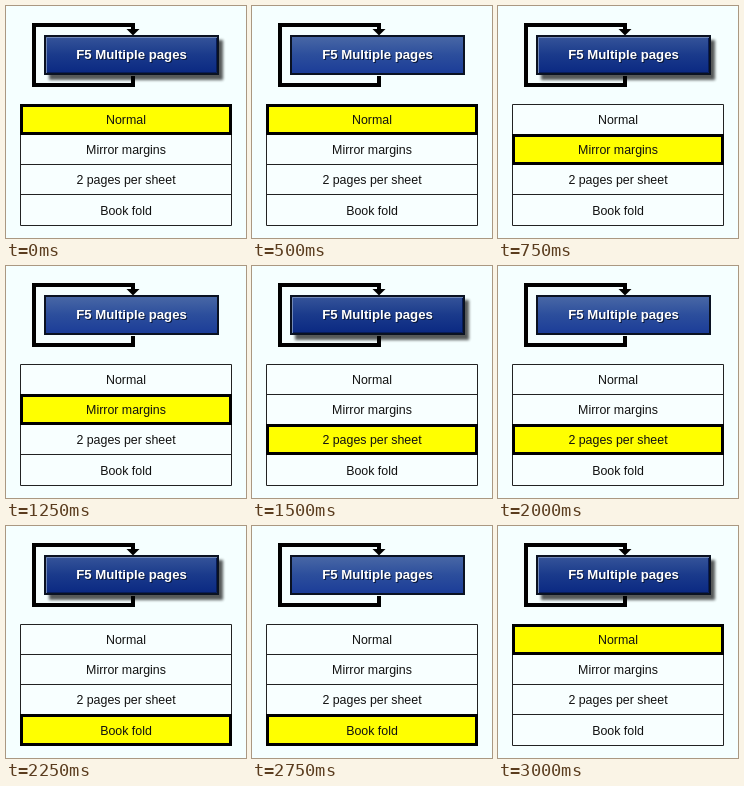
Animation of 240x232 px, one loop 3500 ms. Source, as an HTML page:

```html
<!DOCTYPE html>
<html lang="en">
<head>
<meta charset="utf-8">
<title>Multiple pages</title>
<style>
  html, body { margin: 0; width: 100%; height: 100%; overflow: hidden; background: #f5ffff; }
  svg { display: block; width: 240px; height: 232px; }
  text { font-family: "Liberation Sans", Arial, sans-serif; text-anchor: middle; }
  .label { font-size: 12.4px; fill: #111; }
  .title { font-size: 13.2px; font-weight: bold; }
  .marker { height: 28px; animation: select 3.5s step-end infinite; }
  .raised { animation: press 3.5s step-end infinite; }

  /* The selection moves on every 750 ms; the last row is slightly taller. */
  @keyframes select {
    0%, 85.714% { transform: translateY(0); height: 28px; }
    21.428% { transform: translateY(30px); height: 28px; }
    42.857% { transform: translateY(60px); height: 28px; }
    64.285% { transform: translateY(90px); height: 29px; }
  }
  /* Each step: 500 ms raised, then 250 ms pressed. */
  @keyframes press {
    0%, 21.428%, 42.857%, 64.285%, 85.714% { visibility: visible; }
    14.285%, 35.714%, 57.142%, 78.571% { visibility: hidden; }
  }
</style>
</head>
<body>
<svg viewBox="0 0 240 232">
  <defs>
    <linearGradient id="flat" x1="0" y1="0" x2="0" y2="1">
      <stop offset="0" stop-color="#4968a6"/>
      <stop offset=".5" stop-color="#2c4e9c"/>
      <stop offset="1" stop-color="#1b3c98"/>
    </linearGradient>
    <linearGradient id="deep" x1="0" y1="0" x2="0" y2="1">
      <stop offset="0" stop-color="#36559a"/>
      <stop offset=".5" stop-color="#1a3a8b"/>
      <stop offset="1" stop-color="#0a2882"/>
    </linearGradient>
    <filter id="blur" x="-10%" y="-30%" width="120%" height="160%">
      <feGaussianBlur stdDeviation="1.5"/>
    </filter>
  </defs>

  <path d="M127 70V79H28V19H127V25" fill="none" stroke="#000" stroke-width="4"/>
  <path d="M120.5 23H133.5L127 29.5Z"/>

  <rect x="39" y="30" width="173" height="38" fill="url(#flat)" stroke="#0a1222" stroke-width="2"/>
  <g class="raised">
    <rect x="43" y="34" width="174" height="40" fill="#000" opacity=".65" filter="url(#blur)"/>
    <rect x="39" y="30" width="173" height="38" fill="url(#deep)" stroke="#0a1222" stroke-width="2"/>
    <path d="M40.5 67V31.5H211" fill="none" stroke="#7088b8"/>
    <path d="M41 66.5H210.5V32" fill="none" stroke="#081c58"/>
  </g>
  <text class="title" x="126.5" y="54" fill="#0a1838">F5 Multiple pages</text>
  <text class="title" x="125.5" y="53" fill="#fff">F5 Multiple pages</text>

  <path d="M14.5 98.5H225.5V219.5H14.5ZM14 128.5H226M14 158.5H226M14 188.5H226"
        fill="#f8ffff" stroke="#222"/>
  <rect class="marker" x="15.5" y="99.5" width="209" fill="#ff0" stroke="#000" stroke-width="3"/>
  <g class="label">
    <text x="120" y="118">Normal</text>
    <text x="120" y="148">Mirror margins</text>
    <text x="120" y="178">2 pages per sheet</text>
    <text x="120" y="209">Book fold</text>
  </g>
</svg>
</body>
</html>
```
